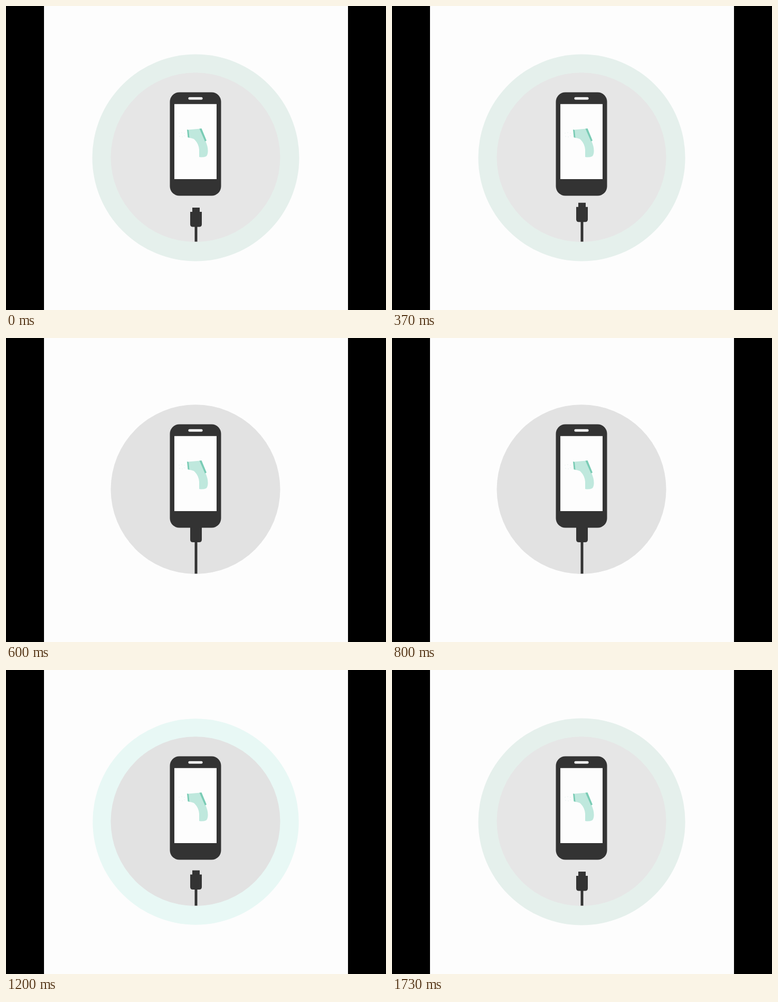
An HTML page for the animation above (2.06 s loop, 720 px wide and 576 px high).

```html
<!DOCTYPE html>
<html lang="en">
<head>
<meta charset="utf-8">
<title>Phone charging</title>
<style>
  html, body { margin: 0; width: 100%; height: 100%; overflow: hidden; background: #000; }
  svg { display: block; width: 100vw; height: 100vh; }
</style>
</head>
<body>
<svg viewBox="0 0 720 576">
  <rect width="720" height="576" fill="#000"/>
  <rect x="72" width="576" height="576" fill="#fdfdfd"/>
  <circle id="halo" cx="359.5" cy="287.5" r="196"/>
  <circle id="disc" cx="359" cy="286.7" r="160.5"/>

  <g fill="#333">
    <path id="cord" d="M360 416V446.5" stroke="#333" stroke-width="5"/>
    <g id="plug">
      <rect x="353" y="382" width="14" height="10"/>
      <path d="M349 390H371V413.500Q371 418.500 366 418.500H354Q349 418.500 349 413.500Z"/>
    </g>
    <rect x="310.500" y="163.500" width="97" height="196" rx="18"/>
  </g>
  <rect x="345.500" y="172.800" width="27" height="4.600" rx="2" fill="#fdfdfd"/>
  <rect x="319" y="185.800" width="80" height="142.200" fill="#fdfdfd"/>

  <path d="M345 234.500L368 232.500L378 256Q383 267 382.500 276Q382 283 379 285Q373 287.500 366 286V272Q365 260 356 252Q352 250 346 249.500Z" fill="#bfe8dd"/>
  <path d="M343 234L346 235L347.500 249.500L344.500 249Z M366.500 232.500L370.500 232L380 255L377 256.500Z" fill="#7accb5"/>
  <g fill="#e3efec">
    <circle cx="328" cy="241" r=".8"/>
    <circle cx="333" cy="240" r=".8"/>
    <circle cx="338" cy="241" r=".8"/>
    <circle cx="329" cy="247" r=".8"/>
    <circle cx="334" cy="248" r=".8"/>
    <circle cx="338" cy="246" r=".8"/>
  </g>
</svg>
<script>
  const LOOP = 2060;
  const TRAVEL = 31.5;
  const [halo, disc, cord, plug] =
    ["halo", "disc", "cord", "plug"].map(id => document.getElementById(id));

  const progress = (t, from, to) => Math.min(1, Math.max(0, (t - from) / (to - from)));
  const ease = (t, from, to) => (1 - Math.cos(Math.PI * progress(t, from, to))) / 2;
  const swell = (t, from, to) => Math.sin(Math.PI * progress(t, from, to));
  const mix = (a, b, k) =>
    `rgb(${a.map((v, i) => Math.round(v + (b[i] - v) * k)).join(",")})`;

  function haloRadius(t) {
    if (t < 370) return 196 + 29 * swell(t, 30, 370);
    if (t < 600) return 196 + 8 * ease(t, 370, 570);
    if (t < 1200) return 190 + 5 * progress(t, 1100, 1200);
    return 195 + progress(t, 1200, 1600) + 29 * swell(t, 1200, 1600);
  }

  function draw(t) {
    const lift = TRAVEL * (ease(t, 280, 530) - ease(t, 913, 1263));
    plug.setAttribute("transform", `translate(0 ${-lift})`);
    cord.setAttribute("d", `M360 ${416 - lift}V446.5`);

    const charge = ease(t, 370, 570) - ease(t, 1200, 1600);
    halo.setAttribute("r", haloRadius(t));
    halo.setAttribute("fill", mix([229, 240, 236], [232, 248, 245], charge));
    halo.setAttribute("visibility", t >= 600 && t < 1100 ? "hidden" : "visible");
    disc.setAttribute("fill", mix([230, 230, 230], [226, 226, 226], charge));
  }

  const start = performance.now();
  function tick() {
    draw((performance.now() - start) % LOOP);
    requestAnimationFrame(tick);
  }
  draw(0);
  requestAnimationFrame(tick);
</script>
</body>
</html>
```
